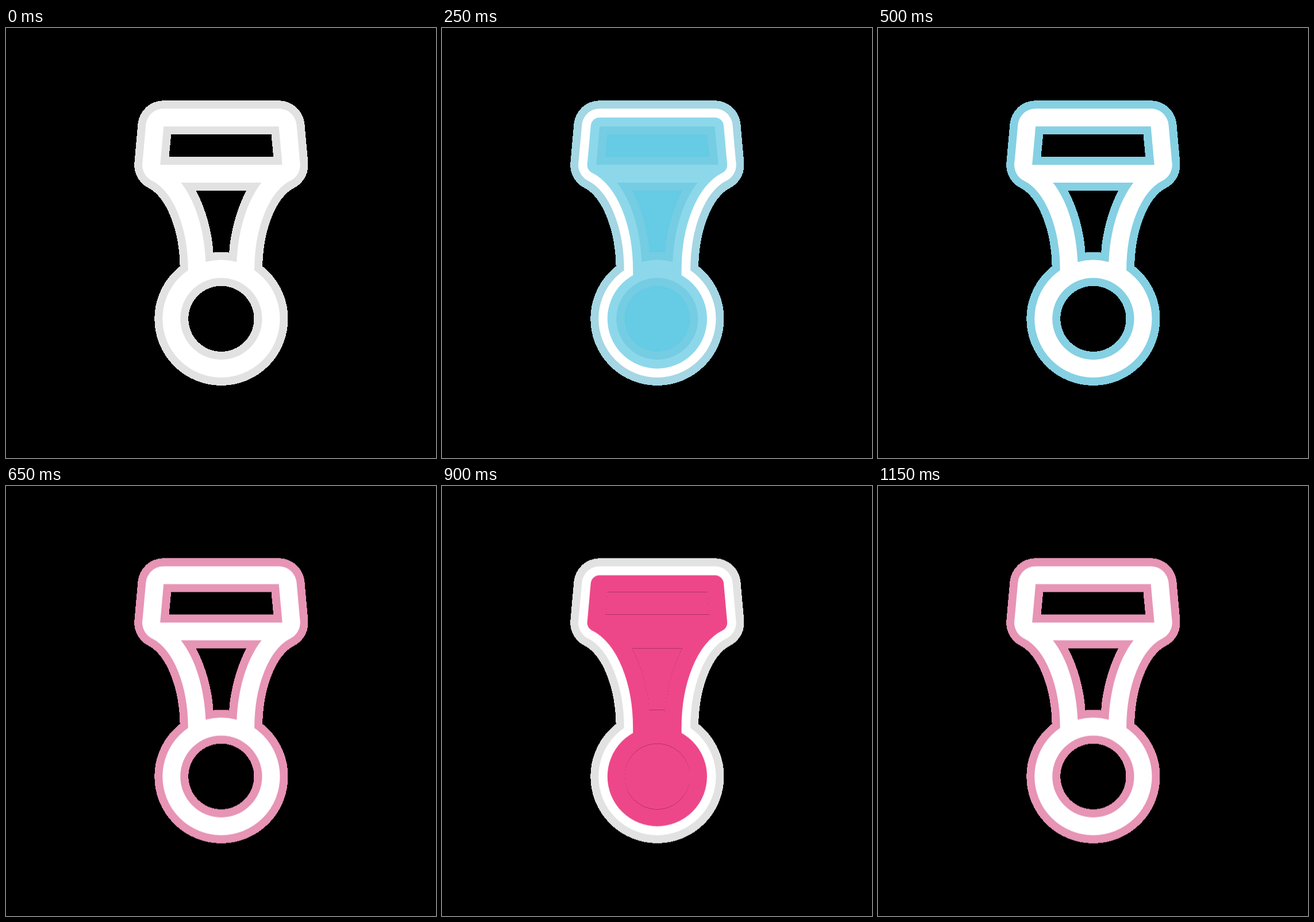
These frames come from a looping animation (748 by 748 pixels, 1.2 s). An HTML page:

```html
<!DOCTYPE html>
<html lang="en">
<head>
<meta charset="utf-8">
<title>Pulsing badge</title>
<style>
  html, body { margin: 0; width: 100%; height: 100%; overflow: hidden; background: #000; }
  svg { display: block; width: 100vw; height: 100vh; }

  #badge { color: #66cbe4; animation: tint 1200ms step-end infinite; }
  .crisp { shape-rendering: crispEdges; }
  .body { stroke-linejoin: round; fill: currentColor; stroke: currentColor; }
  .d45 { stroke-width: 90px; }
  .d31 { stroke-width: 62px; }
  .d15 { stroke-width: 31px; }
  .grey { color: #e2e2e2; }
  .white { color: #fff; }
  .black { color: #000; }
  .holes { fill: currentColor; }

  .rim { opacity: 0; animation: rim 300ms step-end infinite; }
  .core { opacity: 0; animation: core 600ms step-end infinite; }
  .gaps { opacity: 0; animation: gaps 600ms step-end infinite; }

  @keyframes tint {
    0% { color: #66cbe4; transform: none; }
    50%, 100% { color: #ed4789; transform: translateY(-.5px); }
  }
  @keyframes rim {
    0%, 100% { opacity: 0; }
    16.666% { opacity: .5; }
    33.333% { opacity: .75; }
    50% { opacity: 1; }
    66.666% { opacity: .75; }
    83.333% { opacity: .5; }
  }
  @keyframes core {
    0%, 75%, 100% { opacity: 0; }
    33.333% { opacity: .5; }
    41.666% { opacity: .75; }
    50% { opacity: 1; }
    58.333% { opacity: .75; }
    66.666% { opacity: .5; }
  }
  @keyframes gaps {
    0%, 75%, 100% { opacity: 0; }
    33.333% { opacity: 1; }
  }
</style>
</head>
<body>
<svg viewBox="0 0 748 748">
  <defs>
    <path id="head" d="M274.2 171.2H474.6L480.6 238.1H268.2Z"/>
    <g id="frame">
      <use href="#head"/>
      <path d="M268.2 238.1C322 266 347.7 345 347.7 421V436H401.1V421C401.1 345 426.8 266 480.6 238.1Z"/>
      <circle cx="374.4" cy="505.8" r="71.1"/>
    </g>
    <g id="holes">
      <use href="#head"/>
      <path d="M304.3 269.1C331 303.2 345.2 354.8 347.4 407A102 102 0 0 1 401.4 407C403.6 354.8 417.8 303.2 444.5 269.1Z"/>
      <circle cx="374.4" cy="505.8" r="71.1"/>
    </g>
    <g id="gaps">
      <path d="M287.3 184.9H461.5L465.2 223.9H283.6Z"/>
      <path d="M330.8 283.4C347.2 314 358.5 355 360.6 390.6A116 116 0 0 1 388.2 390.6C390.3 355 401.6 314 418 283.4Z"/>
      <circle cx="374.4" cy="505.8" r="57.1"/>
    </g>
  </defs>

  <g id="badge">
    <use class="body d45 crisp grey" href="#frame"/>
    <g class="rim"><use class="body d45 crisp" href="#frame"/></g>
    <use class="body d31 white" href="#frame"/>
    <use class="holes grey" href="#holes"/>
    <g class="rim"><use class="holes" href="#holes"/></g>
    <g class="core"><use class="body d15" href="#frame"/></g>
    <use class="holes crisp black" href="#gaps"/>
    <g class="gaps"><use class="holes crisp" href="#gaps"/></g>
  </g>
</svg>
</body>
</html>
```
